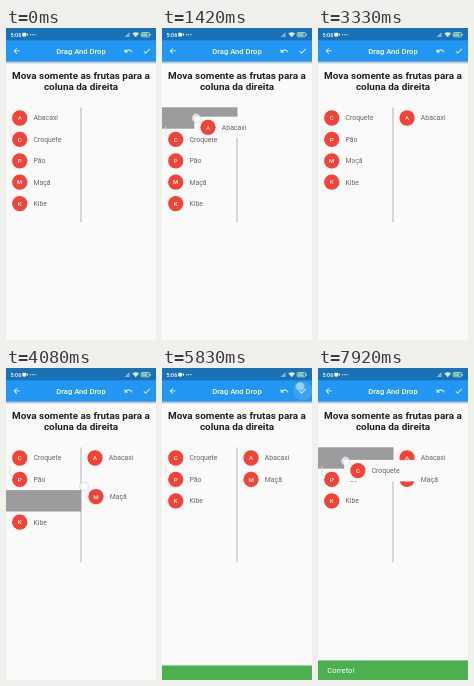
These frames come from a looping animation (150x312 px, 8000 ms). An HTML page:

```html
<!DOCTYPE html>
<html lang="pt">
<head>
<meta charset="utf-8">
<title>Drag And Drop</title>
<style>
  html, body { margin: 0; width: 100%; height: 100%; overflow: hidden; background: #fafafa; }
  svg { display: block; width: 100%; height: 100%; font-family: Roboto, sans-serif; }
  .white { fill: #fff; }
  .middle { text-anchor: middle; }
  .heading { font-size: 9.93px; font-weight: 700; fill: #212121; }
  .title { font-size: 7.64px; font-weight: 500; }
  .clock { font-size: 5.4px; font-weight: 500; }
  .label { font-size: 6.88px; fill: #666; }
  .letter { font-size: 6.1px; font-weight: 500; }
  .snack { font-size: 7.64px; }
</style>
</head>
<body>
<svg viewBox="0 0 150 312">
  <defs>
    <linearGradient id="shade" x2="0" y2="1">
      <stop stop-opacity=".3"/><stop offset="1" stop-opacity="0"/>
    </linearGradient>
  </defs>
  <rect width="150" height="312" fill="#fafafa"/>

  <rect y="33.7" width="150" height="2.6" fill="url(#shade)"/>
  <rect width="150" height="33.7" fill="#2196f3"/>
  <rect width="150" height="12.3" fill="#1971b6"/>
  <g class="white">
    <text class="clock" x="4.6" y="8.6">5:06</text>
    <rect x="16.3" y="4.8" width="3.8" height="3.6" rx=".7"/>
    <path d="M20 6.6l1.8-1.4v2.8z"/>
    <circle cx="24.6" cy="6.7" r=".6"/><circle cx="26.8" cy="6.7" r=".6"/><circle cx="29" cy="6.7" r=".6"/>
    <path d="M118.5 8.9l5-4.8v4.8z" opacity=".45"/>
    <path d="M126.4 5.6q3.3-2.7 6.6 0l-3.3 3.6z" opacity=".85"/>
    <rect x="135.2" y="4.5" width="8.2" height="4.3" rx="1" fill="none" stroke="#fff" stroke-width=".6"/>
    <rect x="136" y="5.2" width="5.6" height="2.9" rx=".4" fill="#8bd67a"/>
    <rect x="143.7" y="5.8" width=".8" height="1.8"/>
    <text class="title middle" x="75" y="25.8">Drag And Drop</text>
    <path transform="translate(6.1 18.4) scale(.382)" d="M20 11H7.83l5.59-5.59L12 4l-8 8 8 8 1.41-1.41L7.83 13H20v-2z"/>
    <path transform="translate(117.9 18.4) scale(.382)" d="M12.5 8c-2.65 0-5.05.99-6.9 2.6L2 7v9h9l-3.62-3.62c1.39-1.16 3.16-1.88 5.12-1.88 3.54 0 6.55 2.31 7.6 5.5l2.37-.78C21.08 11.03 17.15 8 12.5 8z"/>
    <path transform="translate(136.2 18.4) scale(.382)" d="M9 16.17L4.83 12l-1.42 1.41L9 19 21 7l-1.41-1.41z"/>
  </g>
  <circle id="ripple" class="white" cx="140.8" cy="23"/>

  <text class="heading middle" x="75" y="50.6">Mova somente as frutas para a</text>
  <text class="heading middle" x="75" y="62.2">coluna da direita</text>

  <rect x="74.3" y="79.5" width="1.4" height="114.6" fill="#c6c6c8"/>
  <rect id="ghost" width="75.2" height="21.4" fill="#9e9b9e"/>
  <g id="items"></g>
  <rect x="3.3" y="98" width="1.1" height="10" rx=".5" fill="#ddd" opacity=".8"/>

  <g id="snack">
    <rect width="150" height="19.7" fill="#4caf50"/>
    <text id="snackText" class="snack white" x="9.2" y="12.5">Correto!</text>
  </g>
  <circle id="touch" r="4.4" fill="#fff" fill-opacity=".7" stroke="#999" stroke-opacity=".5" stroke-width=".5"/>
</svg>
<script>
const LOOP = 8000, ROW = 21.4, TOP = 79.3, COLUMN = 75.3;
const $ = id => document.getElementById(id);
const clamp = v => Math.min(1, Math.max(0, v));
const ramp = (t, from, length) => clamp((t - from) / length);

// Each gesture: touch down / up times and a path of [time, x, y].
const gestures = [
  { down: 420, up: 2250, path: [[420, 29, 88.5], [1250, 30, 88.5], [1420, 34, 90], [1580, 47, 92], [1830, 80, 94], [2000, 92.8, 94.8]] },
  { down: 3330, up: 4500, path: [[3830, 38, 132], [3920, 50, 127], [4020, 76.5, 119], [4080, 78, 118.5], [4420, 84, 116]] },
  { down: 5330, up: 5750, path: [[5330, 138, 18.5]] },
  { down: 7250, up: 9000, path: [[7750, 25, 92.5], [7920, 27.5, 93]] }
];
const drags = [
  { item: 0, start: 920, drop: 2250, path: gestures[0].path },
  { item: 3, start: 3830, drop: 4500, path: gestures[1].path },
  { item: 1, start: 7750, drop: 9000, path: gestures[3].path }
];

const tiles = ['Abacaxi', 'Croquete', 'Pão', 'Maçã', 'Kibe'].map(name => {
  const g = document.createElementNS('http://www.w3.org/2000/svg', 'g');
  g.innerHTML = `<rect width="74.5" height="${ROW}" fill="#fafafa"/>
    <circle cx="13.75" cy="10.7" r="7.64" fill="#f44336"/>
    <text class="letter white middle" x="13.75" y="12.9">${name[0]}</text>
    <text class="label" x="27.5" y="13.2">${name}</text>`;
  $('items').append(g);
  return g;
});

function along(path, t) {
  const i = path.findIndex(p => p[0] > t);
  if (i === 0) return path[0].slice(1);
  if (i < 0) return path[path.length - 1].slice(1);
  const [a, b] = [path[i - 1], path[i]];
  const k = (t - a[0]) / (b[0] - a[0]);
  return [a[1] + (b[1] - a[1]) * k, a[2] + (b[2] - a[2]) * k];
}

const move = (node, x, y) => node.setAttribute('transform', `translate(${x} ${y})`);

function drawTiles(t) {
  const moved = drags.filter(d => t >= d.drop).map(d => d.item);
  const active = drags.find(d => t >= d.start && t < d.drop);
  const left = tiles.map((_, i) => i).filter(i => !moved.includes(i));
  left.forEach((item, row) => move(tiles[item], 0, TOP + row * ROW));
  moved.forEach((item, row) => move(tiles[item], COLUMN, TOP + row * ROW));
  tiles.forEach((tile, i) => {
    tile.firstChild.style.display = active && active.item === i ? '' : 'none';
  });
  $('ghost').style.display = active ? '' : 'none';
  if (!active) return;
  const tile = tiles[active.item];
  const [x, y] = along(active.path, t - 40);
  $('ghost').setAttribute('y', TOP + left.indexOf(active.item) * ROW);
  if (tile !== $('items').lastChild) $('items').append(tile);
  move(tile, x - 0.8, y - 1);
}

function drawTouch(t) {
  const g = gestures.find(g => t >= g.down && t < g.up + 250);
  $('touch').style.opacity = g ? ramp(t, g.down - 40, 160) * (1 - ramp(t, g.up, 250)) : 0;
  if (g) move($('touch'), ...along(g.path, t));
  $('ripple').setAttribute('r', 4 + 5.5 * ramp(t, 5400, 400));
  $('ripple').style.opacity = 0.16 * ramp(t, 5400, 100) * (1 - ramp(t, 5780, 230));
}

function drawSnack(t) {
  const p = ramp(t, 5720, 250);
  move($('snack'), 0, 312 - 19.6 * (1 - (1 - p) ** 2.3));
  $('snack').style.display = p ? '' : 'none';
  $('snackText').style.opacity = clamp((p - 0.45) / 0.55);
}

function frame(now) {
  const t = now % LOOP;
  drawTiles(t);
  drawTouch(t);
  drawSnack(t);
  requestAnimationFrame(frame);
}
requestAnimationFrame(frame);
</script>
</body>
</html>
```
